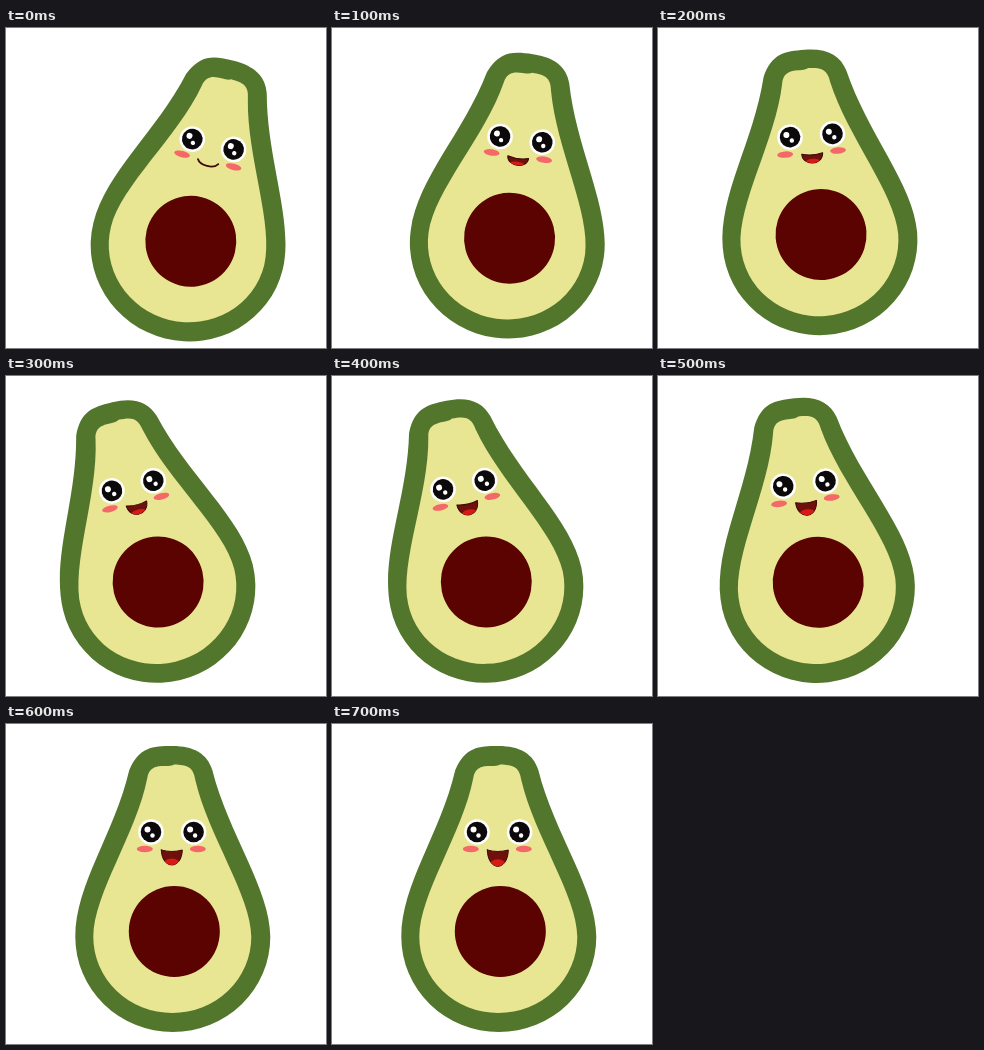
These frames come from a looping animation (320x320 px, 800 ms). An HTML page with a canvas:

```html
<!DOCTYPE html>
<html lang="en">
<head>
<meta charset="utf-8">
<title>Swaying avocado</title>
<style>
  html, body { margin: 0; width: 100%; height: 100%; overflow: hidden; background: #fff; }
  canvas { display: block; width: 320px; height: 320px; }
</style>
</head>
<body>
<canvas id="stage" width="320" height="320"></canvas>
<script>
const ctx = document.getElementById('stage').getContext('2d');
const STEP = 100, STEPS = 8, SWING = 3;
const RIGHT = 14, LEFT = -13.7;

// Upright outlines: round belly, sloping sides, neck.
const CX = 168, CY = 207.5;
const skin = new Path2D(`M69 213 A97.5 95 0 0 0 264 213
  C264 165 222 110 206 46 C201 30 188 22 166 22
  C146 22 133 23 123 46 C108 110 69 160 69 213Z`);
const flesh = new Path2D(`M87 213 A79 76 0 0 0 245 213
  C245 172 202 112 189 56 C187 42 180 41 168 40.5
  C162 45 144 36 141 54 C130 110 87 170 87 213Z`);

// Swing from right to left, then come back upright and rest.
function leanAt(i) {
  const k = i / SWING;
  if (k <= 1) return RIGHT + (LEFT - RIGHT) * k * k * (2.5 - 1.5 * k);
  return LEFT * Math.cos(Math.min(k - 1, 1) * Math.PI / 2);
}

function oval(x, y, rx, ry, color) {
  ctx.fillStyle = color;
  ctx.beginPath();
  ctx.ellipse(x, y, rx, ry, 0, 0, Math.PI * 2);
  ctx.fill();
}

function eye(x, y) {
  oval(x, y, 12.8, 12.8, '#fff');
  oval(x, y, 10.3, 10.3, '#0b0909');
  oval(x - 3.5, y - 2.5, 3, 3, '#fff');
  oval(x + 1.5, y + 3.5, 2.2, 2.2, '#fff');
}

function mouth(x, y, open) {
  ctx.save();
  ctx.translate(x, y);
  ctx.lineCap = ctx.lineJoin = 'round';
  ctx.strokeStyle = '#3a0806';
  ctx.lineWidth = open ? 1 : 1.8;
  ctx.beginPath();
  ctx.moveTo(-10.5, 0);
  if (open) {
    const low = open * 1.3;
    ctx.quadraticCurveTo(0, 3, 10.5, 0);
    ctx.bezierCurveTo(10, low, -10, low, -10.5, 0);
    ctx.closePath();
    ctx.fillStyle = '#70100c';
    ctx.fill();
    ctx.stroke();
    ctx.clip();
    oval(0, open, 9, open * 0.45, '#d81a16');
  } else {
    ctx.bezierCurveTo(-7, 6, 7, 6, 10.5, 0);
    ctx.stroke();
  }
  ctx.restore();
}

function draw(now) {
  const i = Math.floor(now / STEP) % STEPS;
  const lean = leanAt(i);
  ctx.fillStyle = '#fff';
  ctx.fillRect(0, 0, 320, 320);
  ctx.save();
  // The stone drifts and dips along with the lean.
  ctx.translate(168.3 + 1.18 * lean, CY + 0.26 * lean + 0.011 * lean * lean);
  ctx.rotate(lean * Math.PI / 180);
  ctx.translate(-CX, -CY);
  ctx.fillStyle = '#53762d';
  ctx.fill(skin);
  ctx.fillStyle = '#e9e693';
  ctx.fill(flesh);
  oval(CX, CY, 45.5, 45.5, '#5a0301');
  for (const side of [-1, 1]) {
    eye(166 + 21.3 * side, 108);
    oval(165 + 26.5 * side, 125, 8, 3.2, '#f5686a');
  }
  mouth(165.5, 126, i && 7 + 1.4 * i);
  ctx.restore();
}

const start = performance.now();
function tick() {
  draw(performance.now() - start);
  requestAnimationFrame(tick);
}
tick();
</script>
</body>
</html>
```
